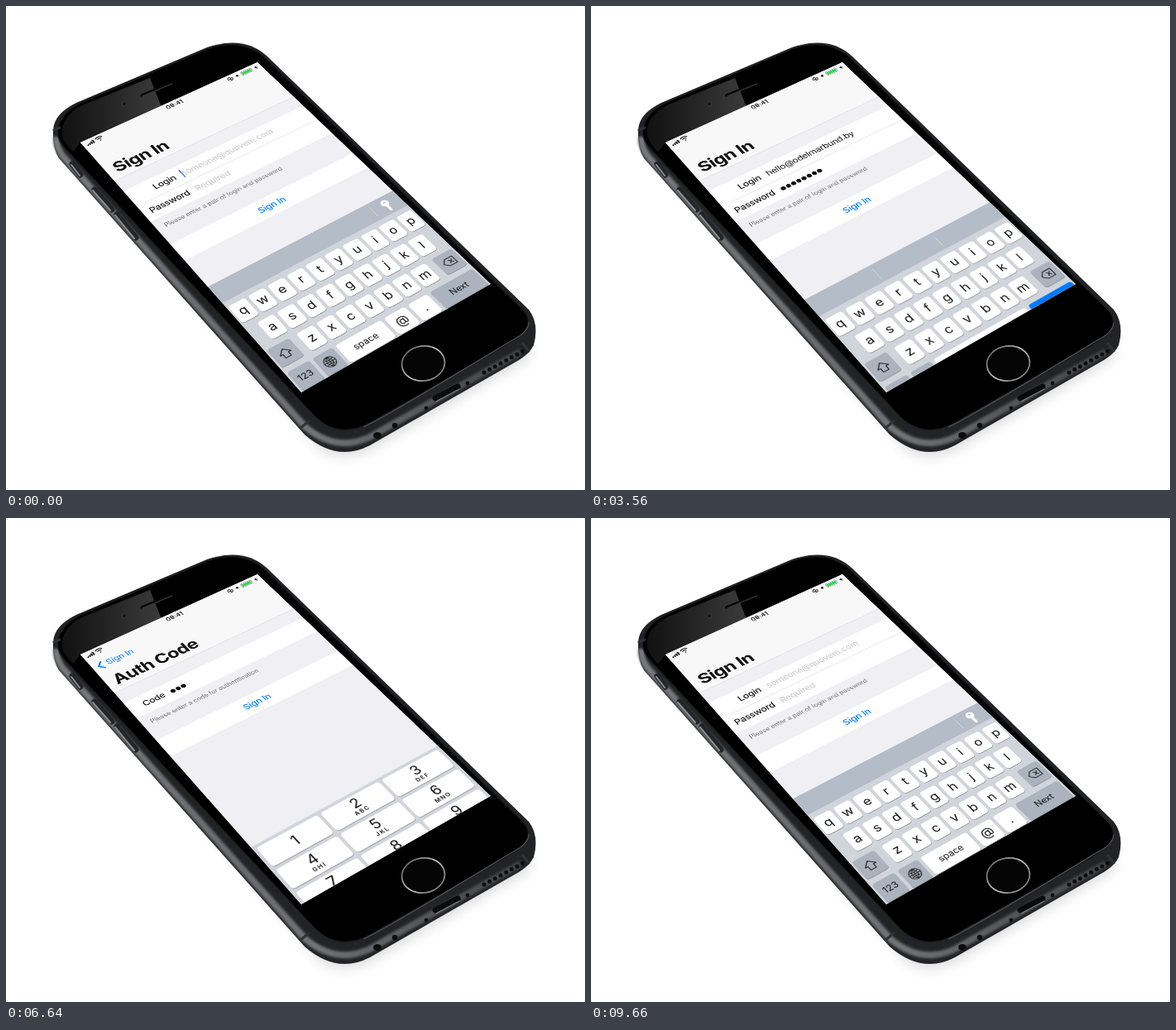
Write an HTML page that moves like this. It is 700x585 px and loops after 9680 ms.

```html
<!DOCTYPE html>
<html lang="en">
<head>
<meta charset="utf-8">
<title>Sign in flow</title>
<style>
html, body { margin: 0; width: 100%; height: 100%; overflow: hidden; background: #fff; }
.stage { position: relative; width: 700px; height: 585px; overflow: hidden; }
.body { position: absolute; inset: 0; }
.screen {
  position: absolute; left: 0; top: 0; width: 375px; height: 667px; overflow: hidden;
  transform-origin: 0 0; background: #efeff4; color: #111;
  transform: matrix3d(.61866,-.247931,0,.00015789, .326216,.355863,0,-.00020752, 0,0,1,0, 90,165,0,1);
  font: 17px/44px Inter, Roboto, sans-serif; letter-spacing: -.3px; white-space: nowrap;
}
:where(.screen) :where(div, svg, b, i) { position: absolute; left: 0; top: 0; font-style: normal; }
:where(.screen) :where(svg) { overflow: visible; fill: none; }
.page, .modal { inset: 0; background: #efeff4; }
.page { top: 116px; }
.row { width: 375px; height: 44px; background: #fff; }
.line { left: 15px; width: 360px; top: 73.5px; height: 1px; background: #dcdce0; }
.label { left: auto; right: calc(375px - var(--end)); font-weight: 500; }
.field { height: 44px; }
.hint { color: #c4c4ca; }
.note { left: 15px; font-size: 12.5px; letter-spacing: -.2px; line-height: 20px; color: #77777c; }
.button { width: 375px; text-align: center; color: #007aff; font-weight: 500; }
.dot { display: inline-block; width: 8.6px; height: 8.6px; margin-right: 2px; border-radius: 50%; background: #111; }
.caret { display: inline-block; width: 2px; height: 21px; vertical-align: -4px; background: #3c6df0; margin-right: -2px; }
.nav { width: 375px; height: 116px; background: #f8f8f9; box-shadow: 0 .6px 0 #c9c9ce; }
.title { left: 15px; top: 69px; font: 700 34px/41px Inter, Roboto, sans-serif; letter-spacing: -.9px; }
.back { left: 27px; top: 22px; color: #007aff; }
.time { width: 375px; text-align: center; font-size: 12.5px; font-weight: 600; line-height: 21px; letter-spacing: .2px; }
.board { width: 375px; background: #d0d4db; }
.key {
  height: 42px; border-radius: 5px; background: #fff; box-shadow: 0 1.2px 0 #898d94;
  text-align: center; font-size: 23px; line-height: 41px; letter-spacing: 0;
}
.key.fn { background: #abb3be; }
.key.small { font-size: 16px; }
.key.done { background: #007aff; color: #fff; }
.bar { width: 375px; height: 42px; background: #b4bcc7; }
.bar i { top: 8px; width: 1px; height: 26px; background: #d3d8df; }
.mailOnly, .passOnly { inset: 0; }
.pass .mailOnly, .board:not(.pass) .passOnly { display: none; }
.digit { width: 117px; height: 46px; line-height: 45px; font-size: 27px; }
.digit.two { line-height: 32px; }
.digit b { width: 100%; top: 28px; font: 600 10.5px/14px Inter, Roboto, sans-serif; letter-spacing: 2px; }
.digit.down { background: #b4bac4; }
.popup { filter: drop-shadow(0 1px 2px rgba(0,0,0,.4)); }
.popup i { left: -28px; width: 56px; top: -78px; text-align: center; font-size: 35px; line-height: 42px; }
.modal { background: #f1f1f6; text-align: center; }
.modal > div { width: 375px; }
.tabbar { top: 618px; height: 49px; background: #fafafb; box-shadow: 0 -1px 0 #d4d4d9; color: #007aff; }

.anim { animation: 9680ms cubic-bezier(.215,.61,.355,1) infinite; }
.in { animation-name: pushIn; }
.out { animation-name: pushOut; }
.fadeOut { animation-name: fadeOut; }
.fadeIn { animation-name: fadeIn; }
.shade { inset: 0; background: #000; animation-name: shade; }
.letters { top: 409px; height: 258px; animation-name: letters; }
.pad { top: 451px; height: 216px; animation-name: pad; }
.modal { animation-name: modal; }
.tapLogin { animation-name: tapLogin; }
.tapCode { animation-name: tapCode; }
.tapLogout { animation-name: tapLogout; }
@keyframes pushIn { 0%, 44.11% { transform: translateX(375px) } 49.28%, 88% { transform: none } 88.01%, 100% { transform: translateX(375px) } }
@keyframes pushOut { 0%, 44.11% { transform: none } 49.28%, 88% { transform: translateX(-112px) } 88.01%, 100% { transform: none } }
@keyframes fadeOut { 0%, 44.11% { opacity: 1 } 46.5%, 88% { opacity: 0 } 88.01%, 100% { opacity: 1 } }
@keyframes fadeIn { 0%, 44.11% { opacity: 0 } 49.28%, 88% { opacity: 1 } 88.01%, 100% { opacity: 0 } }
@keyframes shade { 0%, 44.11% { opacity: 0 } 49.28%, 88% { opacity: .1 } 88.01%, 100% { opacity: 0 } }
@keyframes letters { 0%, 36.67% { transform: none } 39.26%, 94.8% { transform: translateY(262px) } 98.35%, 100% { transform: none } }
@keyframes pad { 0%, 50.1% { transform: translateY(218px) } 53.7%, 68.18% { transform: none } 71.28%, 100% { transform: translateY(218px) } }
@keyframes modal { 0%, 76.96% { transform: translateY(667px) } 82.1%, 91.43% { transform: none } 96.6%, 100% { transform: translateY(667px) } }
@keyframes tapLogin { 0%, 39.8% { opacity: 1 } 41% { opacity: .25 } 43.5%, 100% { opacity: 1 } }
@keyframes tapCode { 0%, 72.3% { opacity: 1 } 73.3% { opacity: .25 } 75.5%, 100% { opacity: 1 } }
@keyframes tapLogout { 0%, 88% { opacity: 1 } 89.2% { opacity: .4 } 91.2%, 100% { opacity: 1 } }
</style>
</head>
<body>
<div class="stage">
  <svg class="body" width="700" height="585" viewBox="0 0 700 585">
    <defs>
      <linearGradient id="edge" gradientUnits="userSpaceOnUse" x1="60" y1="160" x2="640" y2="400">
        <stop offset="0" stop-color="#77787b"/><stop offset=".5" stop-color="#6a6b6e"/>
        <stop offset=".68" stop-color="#737477"/><stop offset="1" stop-color="#3f4043"/>
      </linearGradient>
      <linearGradient id="glare" x1="0" x2="1"><stop offset="0" stop-color="#111"/><stop offset="1" stop-color="#3b3b3b"/></linearGradient>
      <linearGradient id="ring" x2="1" y2="1"><stop offset="0" stop-color="#555"/><stop offset=".5" stop-color="#c4c4c4"/><stop offset="1" stop-color="#666"/></linearGradient>
      <filter id="soft" x="-20%" y="-20%" width="140%" height="140%"><feGaussianBlur stdDeviation="8"/></filter>
      <filter id="sheen" x="-10%" y="-10%" width="120%" height="120%"><feGaussianBlur stdDeviation="1.6"/></filter>
    </defs>
    <path d="M90 190L380 535Q405 552 440 536L635 424L600 370Z" fill="#000" opacity=".15" filter="url(#soft)"/>
    <path d="M57 150Q58 130 85 117L243 50Q288 35 316 61L632 367Q645 384 638 410Q633 420 620 428L440 531Q400 552 361 518L64 184Q56 172 57 150Z" fill="#222326"/>
    <path d="M61 158Q60 170 69 182L362 509Q400 540 440 521L622 418" fill="none" stroke="url(#edge)" stroke-width="8" filter="url(#sheen)"/>
    <path d="M64 143Q70 126 92 116L245 51Q286 38 313 62L626 368Q642 388 612 406L440 504Q403 524 374 497L74 175Q58 160 64 143Z" fill="#000" stroke="#1d1d1f" stroke-width="1.5"/>
    <path d="M68 147Q72 130 94 119L174 87L188 122L90 165L81 176Q65 161 68 147Z" fill="url(#glare)"/>
    <path d="M432 509Q455 499 612 404Q632 394 632 382" fill="none" stroke="#55555a" stroke-width="1.1"/>
    <g stroke-linecap="round" fill="none">
      <path d="M80 191L90 204M107 222L128 246M134 252L157 280" stroke="#242528" stroke-width="7"/>
      <path d="M79 192L89 205M105 223L126 247M132 253L155 281" stroke="#8d8e92" stroke-width="2"/>
      <path d="M58 150l7-3M356 510l10-8M632 417l-7-9" stroke="#303135" stroke-width="3"/>
      <path d="M164 108L200 93" stroke="#080808" stroke-width="3.5"/>
      <path d="M165 109L201 94" stroke="#555" stroke-width=".8"/>
      <path d="M519 474L546 460" stroke="#0b0b0c" stroke-width="7"/>
      <path d="M520 478L548 463" stroke="#8a8a8c" stroke-width="1"/>
      <path d="M578 443L625 417" stroke="#0e0e10" stroke-width="5" stroke-dasharray="0 7.6"/>
    </g>
    <circle cx="143" cy="118" r="2.6" fill="#16191d" stroke="#454545" stroke-width=".7"/>
    <g fill="#0e0e10"><ellipse cx="449" cy="519" rx="5" ry="4"/><circle cx="470" cy="507" r="3.3"/><circle cx="508" cy="486" r="2.4"/><circle cx="558" cy="456" r="2.4"/></g>
    <ellipse cx="504.5" cy="432" rx="26" ry="21" fill="#050505" stroke="url(#ring)" stroke-width="1.7" transform="rotate(-8 504 432)"/>
  </svg>

  <div class="screen">
    <div class="page anim out">
      <div class="row" style="top:30px"><div class="label" style="--end:90px">Login</div><div class="field" id="login" style="left:103px"></div></div>
      <div class="row" style="top:74px"><div class="label" style="--end:90px">Password</div><div class="field" id="password" style="left:103px"></div></div>
      <div class="line"></div>
      <div class="note" style="top:129px">Please enter a pair of login and password</div>
      <div class="row" style="top:180px"><div class="button anim tapLogin">Sign In</div></div>
      <div class="shade anim"></div>
    </div>
    <div class="page anim in">
      <div class="row" style="top:30px"><div class="label" style="--end:68px">Code</div><div class="field" id="code" style="left:80px"></div></div>
      <div class="note" style="top:85px">Please enter a code for authentication</div>
      <div class="row" style="top:136px"><div class="button anim tapCode">Sign In</div></div>
    </div>
    <div class="nav">
      <div class="anim fadeOut"><div class="title anim out">Sign In</div></div>
      <div class="title anim in">Auth Code</div>
      <div class="anim fadeIn">
        <svg style="left:9px;top:34px" width="12" height="21"><path d="M11 1L2 10.5L11 20" stroke="#007aff" stroke-width="3"/></svg>
        <div class="back">Sign In</div>
      </div>
    </div>
    <div class="board letters anim" id="letters">
      <div class="bar">
        <div class="mailOnly"><i style="left:318px"></i>
          <svg style="left:346px;top:21px"><g fill="#fff"><circle cy="-5" r="7.5"/><path d="M-2.5 0H2.5V13L0 16L-2.5 13Z"/></g><circle cy="-7" r="2" fill="#b4bcc7"/></svg></div>
        <div class="passOnly"><i style="left:125px"></i><i style="left:250px"></i></div>
      </div>
      <div class="mailOnly" id="mailKeys"></div>
      <div class="passOnly" id="passKeys"></div>
    </div>
    <div class="board pad anim" id="pad"></div>
    <div id="popups"></div>
    <div class="modal anim">
      <div style="top:260px;font:500 22.5px/30px Inter,Roboto,sans-serif">Successfully Login</div>
      <div style="top:296px;font-size:15px;line-height:18.5px;color:#97979c">If you want to start again,<br>please, logout</div>
      <div style="left:20px;top:351px;width:335px;height:50px;border-radius:9px;background:#007aff;color:#fff;font-weight:500;line-height:50px"><span class="anim tapLogout">Logout</span></div>
      <div class="tabbar">
        <svg style="left:175px;top:6px" width="24" height="24"><g id="grid" fill="#007aff"></g></svg>
        <div style="width:375px;top:36px;font-size:10.5px;font-weight:500;line-height:13px">App</div>
      </div>
    </div>
    <div class="time">09:41</div>
    <svg width="375" height="20">
      <path d="M8 15v-3M12 15v-5M16 15v-7M20 15v-9" stroke="#111" stroke-width="2.8"/>
      <path d="M25 8q7-6 14 0M28 11q4-3.5 8 0M31 14l1 1l1-1" stroke="#111" stroke-width="2"/>
      <circle cx="308" cy="10" r="4.6" stroke="#111" stroke-width="1.6"/><path d="M306 9h4v3h-4z" fill="#111"/>
      <circle cx="323" cy="10" r="2.6" fill="#111"/>
      <rect x="332" y="5.5" width="23" height="10" rx="2.5" stroke="#7c8a7f"/><rect x="333.5" y="7" width="20" height="7" rx="1" fill="#43cf5b"/>
      <path d="M366 5l-5 6h3.5l-1.5 5l5-6.5h-3.5z" fill="#111"/>
    </svg>
  </div>
</div>
<script>
const LOOP = 9680, POPUP = 170, LAG = 40;
const $ = id => document.getElementById(id);
const keyCentre = {};

function addKey(parent, x, y, w, html, cls = '') {
  const key = document.createElement('div');
  key.className = 'key ' + cls;
  key.style.cssText = `left:${x}px;top:${y}px;width:${w}px`;
  key.innerHTML = html;
  parent.append(key);
  return key;
}

const icon = (w, path, width = 1.6) =>
  `<svg style="left:${w / 2}px;top:21px"><path d="${path}" stroke="#222" stroke-width="${width}" stroke-linejoin="round"/></svg>`;
const ERASE = 'M-11 0L-4 -8H11V8H-4ZM0 -4L7 4M7 -4L0 4';
const GLOBE = 'M-10 0A10 10 0 1 0 10 0A10 10 0 1 0 -10 0H10M0 -10V10M0 -10Q-10 0 0 10Q10 0 0 -10M-8 -5Q0 -2 8 -5M-8 5Q0 2 8 5';

const letters = $('letters');
['qwertyuiop', 'asdfghjkl', 'zxcvbnm'].forEach((row, r) => {
  [...row].forEach((ch, i) => {
    const x = [3, 21.75, 59.25][r] + i * 37.5;
    addKey(letters, x, 53 + r * 54, 31.5, ch);
    keyCentre[ch] = [x + 15.75, 483 + r * 54];
  });
});
addKey(letters, 3, 161, 42, icon(42, 'M0 -9L10 1H5V9H-5V1H-10Z'), 'fn');
addKey(letters, 330, 161, 42, icon(42, ERASE), 'fn');
addKey(letters, 3, 215, 42, '123', 'fn small');
addKey(letters, 51, 215, 38, icon(38, GLOBE, 1.3), 'fn');
addKey($('mailKeys'), 95, 215, 89, 'space', 'small');
addKey($('mailKeys'), 190, 215, 42, '@');
addKey($('mailKeys'), 238, 215, 39, '.');
addKey($('mailKeys'), 283, 215, 89, 'Next', 'fn small');
addKey($('passKeys'), 95, 215, 182, 'space', 'small');
addKey($('passKeys'), 283, 215, 89, 'Done', 'small done');
keyCentre['@'] = [211, 645];
keyCentre['.'] = [257.5, 645];

const digitKeys = {};
['', 'ABC', 'DEF', 'GHI', 'JKL', 'MNO', 'PQRS', 'TUV', 'WXYZ'].forEach((abc, i) => {
  digitKeys[i + 1] = addKey($('pad'), 6 + i % 3 * 123, 6 + Math.floor(i / 3) * 53, 117,
    `${i + 1}<b>${abc}</b>`, abc ? 'digit two' : 'digit');
});
addKey($('pad'), 129, 165, 117, '0', 'digit');
const erase = addKey($('pad'), 252, 165, 117, icon(117, ERASE));
erase.style.background = erase.style.boxShadow = 'none';

for (let i = 0; i < 9; i++)
  $('grid').innerHTML += `<rect x="${i % 3 * 9}" y="${Math.floor(i / 3) * 9}" width="7" height="7" rx="1"/>`;

const popups = [0, 1].map(() => {
  const el = document.createElement('div');
  el.className = 'popup';
  el.innerHTML = '<svg><path fill="#fff" d="M-15.75 16Q-15.75 21 -10.75 21H10.75Q15.75 21 15.75 16V-15C15.75 -26 28 -26 28 -38V-76Q28 -84 20 -84H-20Q-28 -84 -28 -76V-38C-28 -26 -15.75 -26 -15.75 -15Z"/></svg><i></i>';
  $('popups').append(el);
  return el;
});

const mail = { text: 'hello@odelmarbund.by', start: 330, step: 95 };
const pass = { text: 'hdkwtmal', start: 2470, step: 120 };
const code = { text: '258', start: 5700, step: 250 };
const pressesOf = ({ text, start, step }) => [...text].map((ch, i) => ({ ch, at: start + i * step }));
const letterPresses = [...pressesOf(mail), ...pressesOf(pass)];
const digitPresses = pressesOf(code);

const DOT = '<span class="dot"></span>';
const typed = ({ text, start, step }, t) =>
  t > 8700 ? '' : text.slice(0, Math.max(0, Math.floor((t - start - LAG) / step) + 1));
const masked = (s, reveal) => reveal && s ? DOT.repeat(s.length - 1) + s.slice(-1) : DOT.repeat(s.length);
const fade = (t, from) => Math.min(1, Math.max(0, 1 - (t - from) / 100));

function setField(id, content, hint, caret) {
  const bar = caret > 0 ? `<span class="caret" style="opacity:${caret}"></span>` : '';
  const html = content ? content + bar : `${bar}<span class="hint">${hint}</span>`;
  const el = $(id);
  if (el.markup !== html) el.innerHTML = el.markup = html;
}

function mailCaret(t) {
  if (t < 290) return fade(t, 20);
  if (t < 2240) return 1;
  return t > 9150 ? fade(t, 9500) : 0;
}

function render(t) {
  letters.classList.toggle('pass', t >= 2240 && t < 9000);
  setField('login', typed(mail, t), 'someone@quovem.com', mailCaret(t));
  setField('password', masked(typed(pass, t), t < 3500), 'Required', t >= 2240 && t < 3500 ? 1 : 0);
  setField('code', masked(typed(code, t), false), 'Required', t >= 5150 && t < 6550 ? 1 : 0);

  const active = letterPresses.filter(p => t >= p.at && t < p.at + POPUP).slice(-2);
  popups.forEach((el, i) => {
    const press = active[i];
    el.style.display = press ? 'block' : 'none';
    if (!press) return;
    const [x, y] = keyCentre[press.ch];
    el.style.left = x + 'px';
    el.style.top = y + 'px';
    el.lastChild.textContent = press.ch;
  });
  digitPresses.forEach(p => digitKeys[p.ch].classList.toggle('down', t >= p.at && t < p.at + 120));
}

let begin;
function tick(now) {
  begin ??= now;
  render((now - begin) % LOOP);
  requestAnimationFrame(tick);
}
render(0);
requestAnimationFrame(tick);
</script>
</body>
</html>
```
